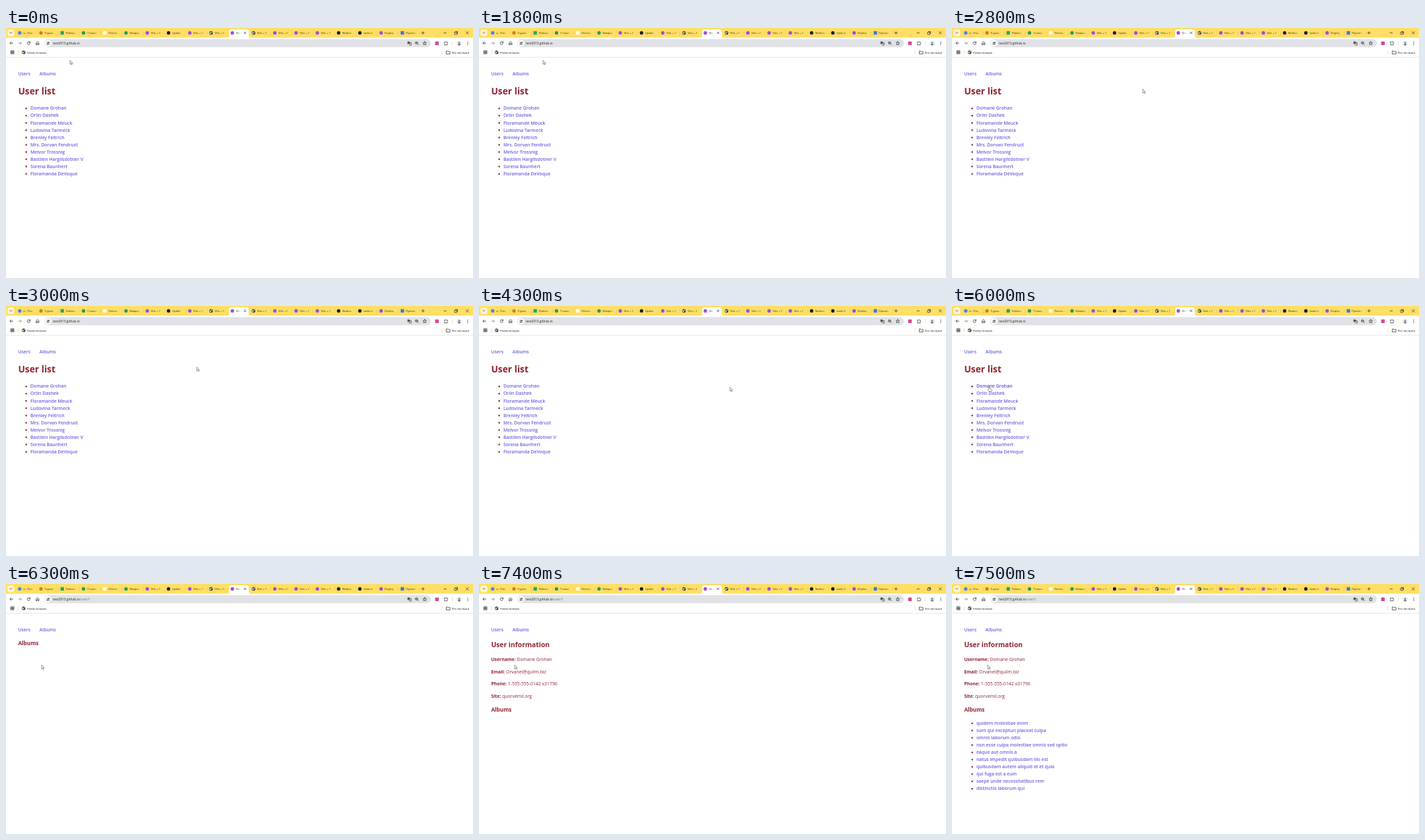
Animation, 708 px wide and 380 px high, one loop 8 s. Source, as an HTML page:

```html
<!DOCTYPE html>
<html lang="ru">
<head>
<meta charset="utf-8">
<style>
html, body { margin: 0; width: 100%; height: 100%; overflow: hidden; background: #fff; }
svg { display: block; width: 708px; height: 380px; }
text { font-family: "Open Sans", "Noto Sans", sans-serif; white-space: pre; }
.tab { font-size: 4.35px; fill: #2f2814; }
.bookmark { font-size: 4.15px; fill: #222; }
.url { font-size: 4.85px; fill: #222; }
.page { font-size: 6.88px; fill: #8f2430; }
.page .link { font-weight: 600; fill: #6a60e2; }
.page .link.hover { fill: #564bd6; }
.page .bold { font-weight: 700; }
.line { fill: none; stroke: #3c3c3c; stroke-width: .8; stroke-linecap: round; stroke-linejoin: round; }
</style>
</head>
<body>
<svg id="stage" viewBox="0 0 708 380"></svg>
<script>
const LOOP = 8000;
const YELLOW = '#fede64', RED = '#8f2430';
const stage = document.getElementById('stage');

const text = (x, y, content, cls = '', size) =>
  `<text x="${x}" y="${y}" class="${cls}"${size ? ` font-size="${size}"` : ''}>${content}</text>`;
const rect = (x, y, w, h, fill, r = 0) =>
  `<rect x="${x}" y="${y}" width="${w}" height="${h}" rx="${r}" fill="${fill}"/>`;
const circle = (x, y, r, fill) => `<circle cx="${x}" cy="${y}" r="${r}" fill="${fill}"/>`;
const line = (d, extra = '') => `<path class="line" d="${d}" ${extra}/>`;
const group = (id, content, cls = '') => `<g id="${id}" class="${cls}">${content}</g>`;

const globe = (x, y) => circle(x, y, 2.7, '#383838') +
  `<path d="M${x - 2} ${y - 1}l1.5 .3 .8 1.2-1 1.3-1.3-1zM${x + .4} ${y - 2}l1.5 1-.5 1-1.2-.7z" fill="#eee"/>`;
const dot = color => (x, y) => circle(x, y, 2.6, color);
const square = color => (x, y) => rect(x - 2.6, y - 2.6, 5.2, 5.2, color, .6);
const violet = dot('#9a4fe0'), green = dot('#259b63'), black = dot('#1f2024');

const tabs = [
  [dot('#4b83ea'), 'я - Пои'], [dot('#c98420'), '9 урок'], [square('#27a567'), 'Рабочи'],
  [green, '7 класс'], [square('#fffdf5'), 'Лента з'], [green, 'Феврал'],
  [violet, 'Vite + R'], [black, 'Updat'], [violet, 'Vite + R'], [globe, 'Vite + R'],
  [violet, 'Vite'], [globe, 'Vite + R'], [violet, 'Vite + R'], [violet, 'Vite + R'],
  [violet, 'Vite + R'], [black, 'Nodvex'], [black, 'todo-lis'], [violet, 'Deploy'],
  [square('#3d79df'), 'Презен']
];
const ACTIVE_TAB = 10;

function tabStrip() {
  let out = rect(0, 0, 708, 14.6, YELLOW) +
    `<path d="M335 14.7q3.4 0 3.4-3.2V5.4q0-3.4 3.4-3.4h23q3.4 0 3.4 3.4v6.1q0 3.2 3.4 3.2z" fill="#fff"/>`;
  tabs.forEach(([icon, title], i) => {
    const x = 20.8 + i * 32.23, active = i === ACTIVE_TAB;
    const end = x + (active ? 13 : 21.5);
    out += icon(x, 7.4) + text(x + 5.4, 9, title, 'tab') +
      rect(end - 5, 3, 5, 9, `url(#${active ? 'fadeWhite' : 'fadeYellow'})`) +
      rect(end, 3, active ? 2 : 4, 9, active ? '#fff' : YELLOW);
    if (!active && i !== ACTIVE_TAB - 1) out += rect(x + 26, 4.6, .5, 5.8, '#e2c258');
  });
  return out + rect(2.2, 2, 10.4, 10.4, '#fff5cf', 3.6) + line('M5.8 6.6l1.6 1.6 1.6-1.6') +
    line('M361 6l2.8 2.8M363.8 6L361 8.8') +
    line('M630.2 7.4h4M632.2 5.4v4') + line('M664 7.5h3.6') +
    line('M680.4 6.4h3.2v3.2h-3.2zM681.4 6.2v-.8h3.2v3.2h-.8', 'stroke-width=".6"') +
    line('M697.5 5.6l3.6 3.6M701.1 5.6l-3.6 3.6');
}

function toolbar() {
  return rect(58, 17, 586, 12.3, '#e1e2e5', 6.15) + circle(63.7, 23.1, 4.8, '#fff') +
    line('M10.4 23H6M8 21l-2 2 2 2') +
    line('M18.8 23h4.4M21.2 21l2 2-2 2', 'opacity=".6"') +
    line('M36.3 22a2.2 2.2 0 1 0 .1 1.8M36.5 20.8v1.5h-1.6') +
    line('M45.6 25.3v-2.8l2.2-1.9 2.2 1.9v2.8h-1.4v-1.7h-1.6v1.7z') +
    line('M61.8 22h1.6M65 22h.9M61.8 24.4h.8M64.4 24.4h1.5') +
    `<circle class="line" cx="64.4" cy="22" r=".7"/><circle class="line" cx="63.2" cy="24.4" r=".7"/>` +
    rect(608.6, 20.4, 3.6, 4.2, '#666', .5) + line('M611 22.4h3.2v3.6h-2.4M609.6 21.7h1.6', 'stroke-width=".6"') +
    `<circle class="line" cx="622.3" cy="22.6" r="1.8"/>` + line('M623.7 24l1.6 1.6M621.5 22.6h1.6') +
    line('M634.8 20.4l.8 1.8 1.9.2-1.4 1.3.4 2-1.7-1-1.7 1 .4-2-1.4-1.3 1.9-.2z', 'stroke-width=".6"') +
    rect(650.6, 20.5, 5.4, 5.4, '#d9468f', .7) +
    line('M664.8 21.4h1.5q.5-1.5 1.4 0h1.4v1.5q1.5.5 0 1.4v1.4h-4.3v-1.4q1.4-.6 0-1.4z') +
    rect(676.2, 20, .6, 6.4, '#f2d76e') +
    circle(687, 23.2, 3.8, '#e3e8ea') + circle(687, 22.6, 1.2, '#59636b') +
    `<path d="M684.9 25.4q2.1-2.4 4.2 0-2 1.8-4.2 0z" fill="#59636b"/>` +
    [21.2, 23.2, 25.2].map(y => circle(700, y, .6, '#333')).join('');
}

function bookmarks() {
  let out = '';
  for (const x of [7.5, 10.3]) for (const y of [34.6, 37.4])
    out += `<rect x="${x}" y="${y}" width="1.8" height="1.8" class="line" stroke-width=".7"/>`;
  return out + rect(18, 33.7, .7, 6.4, '#f2d76e') + globe(26.8, 36.9) +
    text(31.6, 38.5, 'Новая вкладка', 'bookmark') + rect(660.7, 33.7, .7, 6.4, '#f2d76e') +
    line('M667.8 35h2l.7.8h2.7v3.6h-5.4z', 'stroke-width=".7"') +
    text(676, 38.5, 'Все закладки', 'bookmark') + rect(0, 44, 708, .6, '#d9d9dc');
}

const list = (items, baseline) => items.map((item, i) => {
  const y = baseline + i * 11.05;
  return circle(30.6, y - 2.2, 1.25, RED) + text(36.9, y, item, 'link');
}).join('');
const heading = (y, content, size) => text(18.4, y, content, 'bold', size);
const field = (y, label, value) => text(18.4, y, `<tspan class="bold">${label}:</tspan> ${value}`);

const users = ['Domane Grohan', 'Orlin Dashek', 'Floramande Meuck', 'Ludovina Tarmeck',
  'Brenley Feltrich', 'Mrs. Dorvan Fendrust', 'Melvor Trossnig', 'Bastilen Hargilsdotner V',
  'Sorena Baunhert', 'Floramanda DeVoque'];
const albums = ['quidem molestiae enim', 'sunt qui excepturi placeat culpa', 'omnis laborum odio',
  'non esse culpa molestiae omnis sed optio', 'eaque aut omnis a', 'natus impedit quibusdam illo est',
  'quibusdam autem aliquid et et quia', 'qui fuga est a eum', 'saepe unde necessitatibus rem',
  'distinctio laborum qui'];

stage.innerHTML = `<defs>` +
  [['fadeYellow', YELLOW], ['fadeWhite', '#fff']].map(([id, color]) =>
    `<linearGradient id="${id}"><stop stop-color="${color}" stop-opacity="0"/>` +
    `<stop offset="1" stop-color="${color}"/></linearGradient>`).join('') + `</defs>` +
  tabStrip() + toolbar() + bookmarks() +
  text(71, 24.9, 'test2913.github.io<tspan id="path" fill="#777">/user/1</tspan>', 'url') +
  group('nav', text(18.4, 71.6, 'Users', 'link') + text(50.7, 71.6, 'Albums', 'link'), 'page') +
  group('userList', heading(100.7, 'User list', 13.8) + list(users, 124.4), 'page') +
  group('loading', heading(93.3, 'Albums', 8.25), 'page') +
  group('info', heading(95.6, 'User information', 10.35) +
    field(117.4, 'Username', users[0]) + field(135.8, 'Email', 'Orvanel@quilm.biz') +
    field(154.3, 'Phone', '1-555-555-0142 x31790') + field(172.7, 'Site', 'quorvemil.org') +
    heading(193.7, 'Albums', 8.25), 'page') +
  group('albumList', list(albums, 213.9), 'page') +
  `<g id="cursor" fill="#fff" stroke="#444" stroke-width=".55" stroke-linejoin="round">
    <path id="arrow" d="M0 0V5.9L1.4 4.7 2.4 6.8 3.3 6.4 2.4 4.3H4.1Z"/>
    <path id="hand" d="M1.1 .5q.8-.8 1.3 0v2.9l2.2 .5q1.1 .3 1.1 1.3l-.6 2.9H2L0 5.4q-.1-1 1.1-.3z"/>
  </g>`;

// Pointer stops: time, x, y, index of the hovered user (-1: none), pointing hand
const pointer = [
  [0, 97, 49.2, -1], [2300, 115, 51, -1], [2400, 140.4, 54.6, -1], [2800, 289.2, 92.8, -1],
  [4300, 380.4, 123.5, -1], [4600, 327.5, 110.5, -1], [4900, 62, 134, 1, true],
  [5000, 54.3, 126, 1], [5100, 54.6, 124.5, 0, true], [5400, 54.6, 122, 0, true],
  [6300, 54, 123, -1]
];

const byId = id => document.getElementById(id);
const show = (id, visible) => byId(id).setAttribute('display', visible ? 'inline' : 'none');
const userLinks = [...byId('userList').querySelectorAll('.link')];

function draw(t) {
  const [, x, y, hovered, pointing] = pointer.findLast(stop => stop[0] <= t);
  byId('cursor').setAttribute('transform', `translate(${x} ${y})`);
  show('hand', pointing);
  show('arrow', !pointing);
  userLinks.forEach((link, i) => link.classList.toggle('hover', i === hovered));
  show('path', t >= 6300);
  show('userList', t < 6300);
  show('loading', t >= 6300 && t < 7400);
  show('info', t >= 7400);
  show('albumList', t >= 7500);
}

const start = performance.now();
function frame() {
  draw((performance.now() - start) % LOOP);
  requestAnimationFrame(frame);
}
frame();
</script>
</body>
</html>
```
